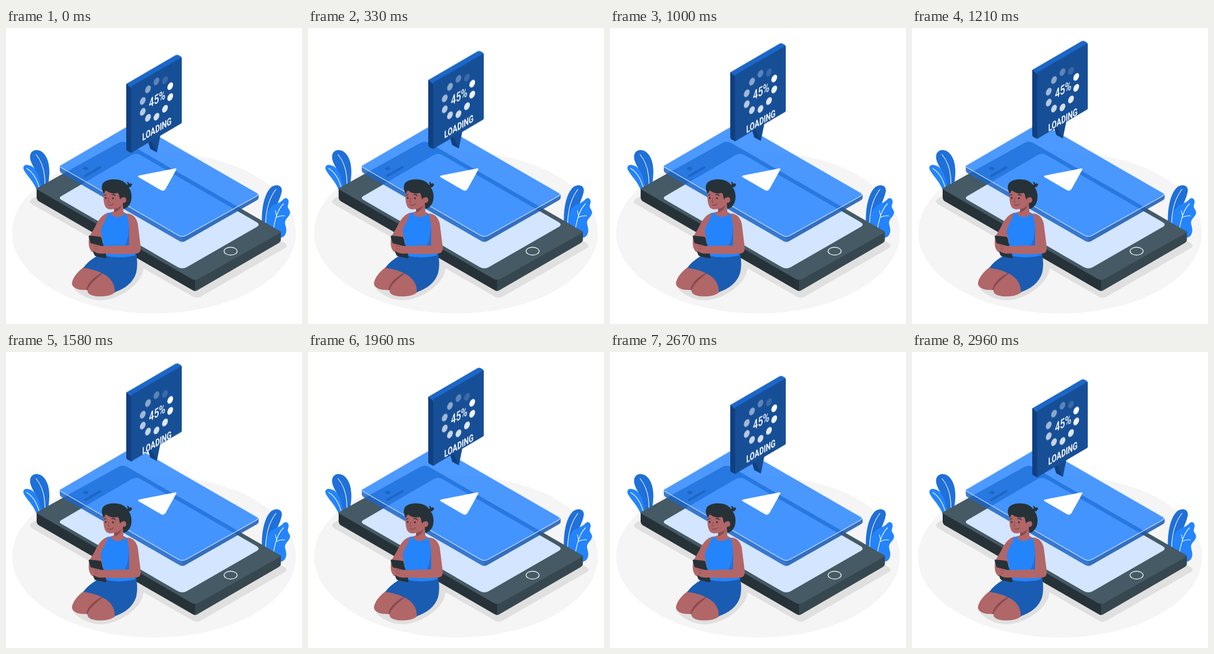
These frames come from a looping animation (512 by 512 pixels, 3 s). An HTML page without scripts:

```html
<!DOCTYPE html>
<html lang="en">
<head>
<meta charset="utf-8">
<title>Loading</title>
<style>
  html, body { margin: 0; width: 100%; height: 100%; overflow: hidden; background: #fff; }
  svg { display: block; width: 100vw; height: 100vh; }
  .float { animation: float 3s -45ms infinite; }
  .sign { --lift: -30px; }
  .label { --lift: -20px; }
  @keyframes float {
    0%, 100% { transform: translateY(0); animation-timing-function: steps(36); }
    50% { transform: translateY(var(--lift)); animation-timing-function: steps(36); }
  }
  text { font-family: Roboto, "Liberation Sans", sans-serif; fill: #fff; text-anchor: middle; }
  .skin { fill: #b16668; }
  .ink { fill: #263238; }
  .shadow { fill: #e0e0e0; }
  .deep { fill: #1f70d8; }
  .bright { fill: #2484fb; }
  .line { fill: none; stroke-linecap: round; stroke-linejoin: round; }
  .vein { stroke: #fff; stroke-width: 1.1; }
</style>
</head>
<body>
<svg viewBox="0 0 512 512">
  <defs>
    <circle id="dot" cx="30.5" r="6.1" fill="#fff"/>
  </defs>

  <ellipse cx="256" cy="354" rx="245.500" ry="140" fill="#f5f5f5"/>
  <path class="shadow" d="M47 294Q36 300 47 306L322 464Q330 469 338 464L482 381Q489 377 482 372L300 270L180 222Z"/>
  <path class="shadow" d="M118 452Q138 470 162 471C190 472 236 446 238 414L220 400L140 430Z"/>

  <!-- plants -->
  <g>
    <path class="deep" d="M62 288C60 260 50 246 44 233C39 222 42 212 52 211C66 211 75 227 75 248C75 260 73 268 71 288Z"/>
    <path class="bright" d="M56 288C49 266 39 259 33 249C27 241 31 236 38 237C51 239 59 253 62 288Z"/>
    <path class="line vein" d="M52 219C64 233 69 252 67 280M36 243C47 250 55 263 59 282"/>
    <path class="deep" d="M443 345C441 315 446 287 459 275C468 269 478 272 477 282C475 298 461 313 461 345Z"/>
    <path class="bright" d="M447 345C449 323 455 308 466 305C472 302 476 301 480 296C486 291 491 298 488 305C486 311 489 312 491 317C493 324 485 328 483 334C481 340 487 346 484 355C482 362 476 363 472 363Z"/>
    <path class="line vein" d="M467 279C456 293 450 313 449 337M480 304C470 314 466 329 463 345M467 328Q474 324 482 325M468 325L466 316"/>
  </g>

  <!-- device -->
  <path class="ink" d="M53 278V293Q53 298 59 301L321 452.500Q325 455 328 455L340 400Z"/>
  <path fill="#37474f" d="M327 434V455Q330 454.500 333 452.500L470 373Q475.500 370 475.500 366V352L400 370Z"/>
  <path fill="#455a64" d="M55 280Q51.500 278.200 55 276.200L194 199Q202 194.500 210 199L473 350.800Q478 353 473 355L333 434Q327 437.500 321 434Z"/>
  <path fill="#d3e5ff" d="M97 298Q89 294 97 290L217 220Q225 215.500 233 220L433 335.500Q441 340 433 344.500L313 413.500Q305 418 297 413.500Z"/>
  <ellipse class="line" cx="388.500" cy="386" rx="11.300" ry="6.700" stroke="#e8ecee" stroke-width="1.400"/>

  <!-- glass screen -->
  <path fill="#1d66c8" opacity=".85" d="M93 239V246Q93 249 97 251.500L298 367.500Q302 370 305 370V361L298 358.500L96 241.500Z"/>
  <path fill="#1d5cb2" opacity=".87" d="M305 361V370Q308 370 312 367.500L433 298.500Q437 296 437 294V287L433 290.500L312 358.500Z"/>
  <path fill="#2080ff" opacity=".8" d="M96 242Q90 239 96 236L215 167Q222 163 229 167L433 284.500Q440 288 433 291L312 358.500Q305 362.500 298 358.500Z"/>
  <ellipse cx="138" cy="243" rx="4.600" ry="2.700" fill="#1d66c8"/>
  <path class="line" stroke="#1d66c8" stroke-width="4" d="M137 256L163 241"/>
  <path class="line" stroke="#dceaff" stroke-width="1.200" d="M94 237.500L215 167Q222 163 229 167L433 284.500Q437 286.500 436 288"/>
  <path class="line" stroke="#cfe3ff" stroke-width="1.100" d="M94 240.500L298 358.500Q305 362.500 312 358.500L433 291L436 288"/>
  <path fill="#fff" d="M230 258.500Q226 256 231 255L292 243Q296 242 294 246L276 278.500Q273 283 268 280.500Z"/>

  <!-- sign -->
  <g class="float sign">
    <path fill="#103f7c" d="M246 198L249.500 210L261 216L257 190Z"/>
    <path fill="#154b90" d="M251 196L261 216L267 186Z"/>
    <path fill="#113f7f" d="M208 97L220 100V215L216.500 216.800L210 213.500Q208 212 208 210Z"/>
    <path fill="#1b67c9" d="M208 97.500L293 48Q296 46.500 299 48L303 50.500Q304 51.500 304 54L217 105Z"/>
    <path fill="#174f97" d="M216.500 103Q216.500 102 218 101L302 52.500Q304 51.500 304 53.500V164Q304 165.300 303 165.900L216.500 216.800Z"/>
  </g>
  <g class="float label">
    <g transform="matrix(.82 -.44 0 1 260.300 123.400)">
      <use href="#dot" transform="rotate(-18)"/>
      <use href="#dot" transform="rotate(18)" opacity=".93"/>
      <use href="#dot" transform="rotate(54)" opacity=".87"/>
      <use href="#dot" transform="rotate(90)" opacity=".82"/>
      <use href="#dot" transform="rotate(126)" opacity=".76"/>
      <use href="#dot" transform="rotate(162)" opacity=".69"/>
      <use href="#dot" transform="rotate(198)" opacity=".6"/>
      <use href="#dot" transform="rotate(234)" opacity=".5"/>
      <use href="#dot" transform="rotate(270)" opacity=".3"/>
      <use href="#dot" transform="rotate(306)" opacity=".15"/>
    </g>
    <text transform="matrix(.69 -.4 0 1 261.500 130.500)" font-size="22" font-weight="500">45%</text>
    <text transform="matrix(.69 -.4 0 1 261 181.300)" font-size="17.500" font-weight="700">LOADING</text>
  </g>

  <!-- woman -->
  <g>
    <path class="skin" d="M138 411C126 419 115 431 114 442C115 452 130 454 142 453L172 424Z"/>
    <path fill="#874a4f" d="M167 423C153 430 141 440 139 453L146 455L176 428Z"/>
    <path class="skin" d="M168 424C154 435 140 447 141 456C144 464 158 465 170 464C180 463 186 460 190 456L190 428Z"/>
    <path fill="#1a5cb2" d="M158 394C146 401 138 408 134 415C151 417 163 422 173 428C183 435 189 445 188 457C206 451 220 440 225 424C228 412 227 400 225 390Z"/>
    <path class="skin" d="M178 319C167 322 160 331 154 344L144 361C142 373 143 383 150 388L166 377L169 355L181 336Z"/>
    <path class="skin" d="M186 305L187 317L178 320L184 333L204 333L210 322L203 318L202 303Z"/>
    <path class="bright" d="M181 319L176 321C173 334 164 343 164 352C165 361 169 366 167 381L171 394Q198 400 224 393L220 372L216 326L207 321Q202 326 193 327Q184 327 181 319Z"/>
    <path fill="#1f70d8" d="M212 345C213 358 209 368 205 377L217 379Z"/>
    <path class="ink" d="M144 359L162 361Q164 361 165 363L174 396Q174 399 171 398L156 395Q153 394 152 391L143 361Z"/>
    <path class="skin" d="M209 321C220 321 226 329 228 339L233 379Q234 389 226 390C205 392 185 391 171 390C163 391 156 390 152 386C149 380 154 376 163 377L176 377L213 376L213 341Z"/>
    <path class="skin" d="M144 371Q147 373 153 374L165 377Q168 380 163 382L150 387Q143 383 144 371Z"/>
    <path class="line" stroke="#874a4f" stroke-width=".8" d="M152 377L159 378M153 382L158 382"/>
    <path fill="#874a4f" d="M187 313Q195 312 200 306Q198 315 187 319Z"/>
    <path class="skin" d="M170 279C168 289 168 299 171 307C173 313 179 315 186 313C193 312 198 308 201 304L207 306L210 287L200 276Z"/>
    <path class="ink" d="M170 287C165 282 164 272 169 267C176 261 192 260 202 265C206 267 208 270 210 272Q211 268 209 266Q213 266 213 270Q215 267 218 270Q218 275 212 276C217 281 219 293 215 303Q211 311 203 313L202 304Q205 299 203 295Q199 291 198 297C195 293 197 288 193 285C186 288 178 285 173 281Q170 283 170 287Z"/>
    <ellipse class="skin" cx="204" cy="297.500" rx="4" ry="5"/>
    <path class="line" stroke="#263238" stroke-width="1.300" d="M170 289.500L173 288M183 288.500Q186 287 189 290"/>
    <ellipse class="ink" cx="172.500" cy="294" rx="1.400" ry="1.700"/>
    <ellipse class="ink" cx="185" cy="294.500" rx="1.400" ry="1.700"/>
    <path class="line" stroke="#874a4f" stroke-width="1" d="M178 294L176.500 301L179 301.500"/>
    <path class="line" stroke="#6f383d" stroke-width="1" d="M177 306Q182 308 186 304"/>
  </g>
</svg>
</body>
</html>
```
